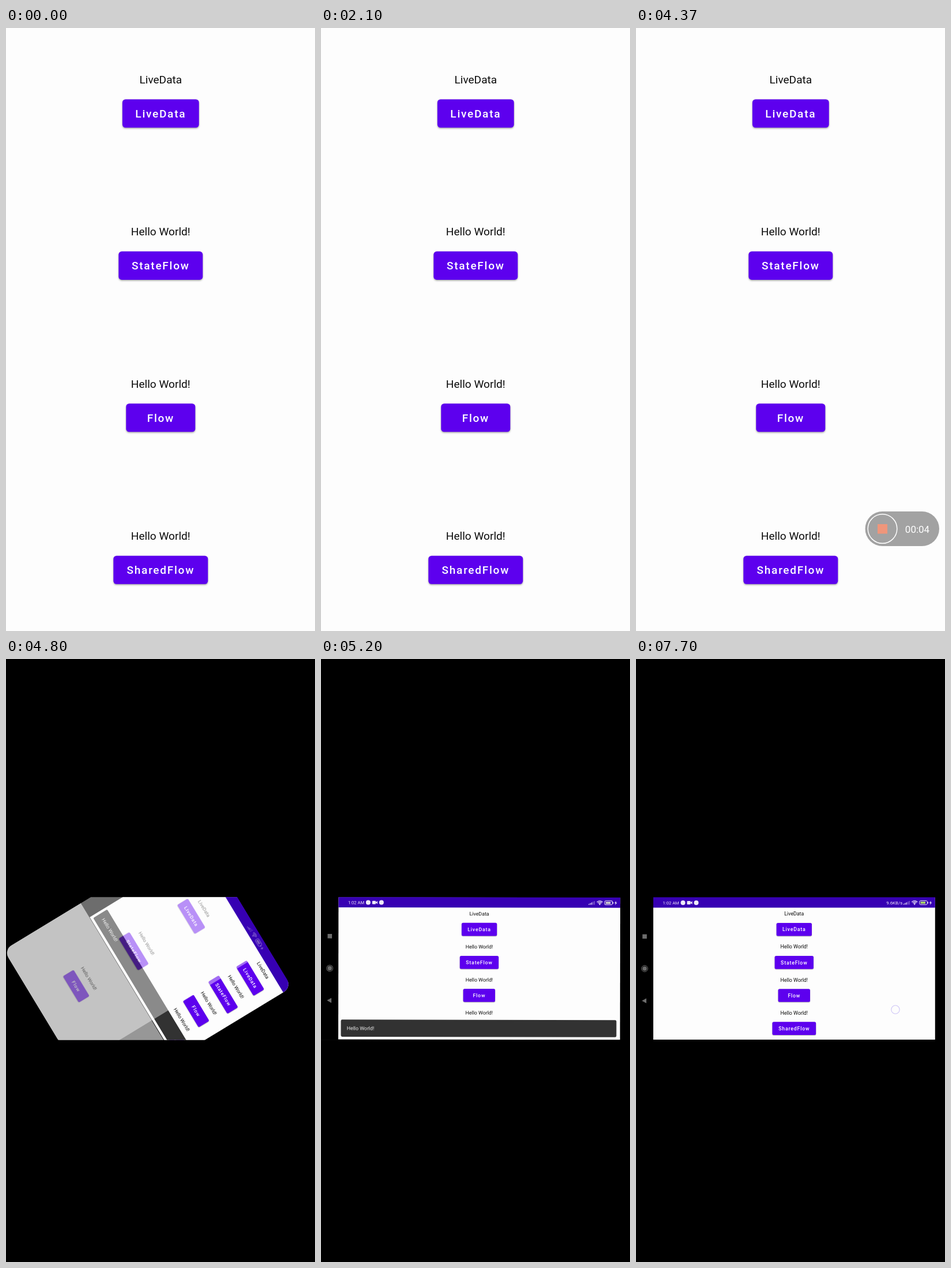
An HTML page with a canvas that plays this animation: 536x1044 px, repeating every 7730 ms.

```html
<!DOCTYPE html>
<html lang="en">
<head>
<meta charset="utf-8">
<style>
html, body { margin: 0; width: 100%; height: 100%; overflow: hidden; background: #000; }
canvas { display: block; }
</style>
</head>
<body>
<canvas id="stage" width="536" height="1044"></canvas>
<script>
const LOOP = 7730, W = 536, H = 1044;
const STRIP = W * 1080 / 2340;            // landscape screen height
const STRIP_MID = 536;
const FULL = W * 2340 / 1080;             // whole portrait screen
const CROP = 45;                          // hidden above the portrait view
const SHRINK = STRIP / W;                 // portrait to landscape scale
const PORTRAIT_DP = 1.364, LAND_DP = PORTRAIT_DP * SHRINK;
const FONT = 'Roboto, sans-serif';
const BUTTONS = [['LiveData', 97.4], ['StateFlow', 107], ['Flow', 88], ['SharedFlow', 120.2]];

const ctx = document.getElementById('stage').getContext('2d');
const portrait = document.createElement('canvas');
portrait.width = W;
portrait.height = Math.ceil(FULL);
const portraitCtx = portrait.getContext('2d');

const clamp = v => Math.max(0, Math.min(1, v));
const lerp = (a, b, p) => a + (b - a) * p;

function rect(g, x, y, w, h, color) {
  g.fillStyle = color;
  g.fillRect(x, y, w, h);
}

function pill(g, x, y, w, h, r, color) {
  g.fillStyle = color;
  g.beginPath();
  g.roundRect(x, y, w, h, r);
  g.fill();
}

function circle(g, x, y, r, color, line) {
  g.beginPath();
  g.arc(x, y, r, 0, Math.PI * 2);
  if (line) {
    g.strokeStyle = color;
    g.lineWidth = line;
    g.stroke();
  } else {
    g.fillStyle = color;
    g.fill();
  }
}

function polygon(g, points, color) {
  g.fillStyle = color;
  g.beginPath();
  points.forEach(([x, y]) => g.lineTo(x, y));
  g.fill();
}

function text(g, str, x, y, size, color, align = 'left', weight = 400, spacing = 0) {
  g.font = `${weight} ${size}px ${FONT}`;
  g.letterSpacing = spacing + 'px';
  g.textAlign = align;
  g.fillStyle = color;
  g.fillText(str, x, y);
}

// Four label and button pairs; y is the middle of the first label.
function rows(g, cx, y, pitch, dp) {
  BUTTONS.forEach(([name, width], i) => {
    const mid = y + i * pitch, top = mid + 25.1 * dp, w = width * dp;
    text(g, i ? 'Hello World!' : name, cx, mid + 5 * dp, 14 * dp, '#0c0c0c', 'center');
    g.save();
    g.shadowColor = 'rgba(0,0,0,.35)';
    g.shadowBlur = 2.2 * dp;
    g.shadowOffsetY = 1.1 * dp;
    pill(g, cx - w / 2, top, w, 36 * dp, 4 * dp, '#5d00ee');
    g.restore();
    text(g, name, cx, top + 23 * dp, 14 * dp, '#fff', 'center', 500, 1.25 * dp);
  });
}

function statusBar(g, left, right, speed) {
  rect(g, left, 0, right - left, 18.2, '#3700b3');
  const ink = '#eeeaf8';
  text(g, '1:02 AM', left + 16.6, 12.6, 7.6, ink);
  circle(g, left + 51.5, 9.7, 4, ink);
  circle(g, left + 74.5, 9.7, 4, ink);
  pill(g, left + 58.5, 6.8, 6.2, 5.8, 1, ink);
  polygon(g, [[left + 64, 9.7], [left + 67.6, 7], [left + 67.6, 12.4]], ink);

  for (let i = 0; i < 5; i++) {
    const h = 1.6 + i * 1.2;
    rect(g, right - 55 + i * 2.4, 13 - h, 1.3, h, i < 3 ? ink : '#8a6bd0');
  }
  g.lineCap = 'butt';
  for (const r of [2.2, 4.4, 6.6]) {
    g.beginPath();
    g.arc(right - 35.6, 12.9, r, -Math.PI * 0.77, -Math.PI * 0.23);
    g.strokeStyle = ink;
    g.lineWidth = 1.2;
    g.stroke();
  }
  circle(g, right - 35.6, 12.5, 1, ink);
  g.strokeStyle = ink;
  g.lineWidth = 1;
  g.beginPath();
  g.roundRect(right - 27, 6.2, 13.5, 6.8, 2);
  g.stroke();
  rect(g, right - 25.2, 7.8, 8.4, 3.6, speed ? '#a9d86a' : '#d5d4cf');
  rect(g, right - 13, 8.3, 1.2, 2.6, ink);
  polygon(g, [[right - 7, 6.2], [right - 10, 10.2], [right - 8, 10.2],
    [right - 9, 13.6], [right - 5.6, 9.2], [right - 7.6, 9.2]], ink);
  if (speed) text(g, '9.6KB/s', right - 56.5, 12.6, 7.9, ink, 'right');
}

function recorderChip(g, alpha) {
  if (!alpha) return;
  g.save();
  g.globalAlpha = alpha;
  pill(g, 397.5, 837, 128.5, 60, 30, '#a2a2a2');
  circle(g, 427.5, 867, 25.3, '#fff', 1.5);
  rect(g, 419, 859, 17, 16.5, '#ef967b');
  text(g, '00:04', 488, 873.5, 17, '#fff', 'center');
  g.restore();
}

function drawPortrait(t) {
  const g = portraitCtx;
  rect(g, 0, 0, W, FULL, '#fdfdfd');
  g.save();
  g.scale(1 / SHRINK, 1 / SHRINK);
  statusBar(g, 0, STRIP, false);
  g.restore();
  g.save();
  g.translate(0, CROP);
  rows(g, 268.3, 89.2, 263.4, PORTRAIT_DP);
  recorderChip(g, clamp((t - 4310) / 55));
  g.restore();
  rect(g, 0, FULL - 65, W, 65, '#000');
}

function navBar(g) {
  const ink = '#6c6c6c', mid = STRIP / 2;
  rect(g, 11.2, mid - 59.4, 7.6, 7.6, ink);
  circle(g, 15, mid, 5.4, ink, 1);
  circle(g, 15, mid, 3.8, ink);
  polygon(g, [[10.2, mid + 55.7], [18, mid + 51.4], [18, mid + 60]], ink);
}

function drawLandscape(g, t) {
  rect(g, 0, 0, W, STRIP, '#000');
  rect(g, 30, 0.7, 488.8, STRIP - 1.4, '#fdfdfd');
  rows(g, 274.3, 28.8, 57.15, LAND_DP);
  statusBar(g, 30, 518.8, t > 5700);
  navBar(g);

  g.save();
  g.globalAlpha = 1 - clamp((t - 7600) / 80);
  pill(g, 34.5, 212.6, 478, 29.6, 2.4, '#323232');
  text(g, 'Hello World!', 44.8, 230.6, 8.8, '#ececec');
  g.restore();

  const touch = clamp((t - 7130) / 150);
  if (touch) {
    const lift = clamp((t - 7570) / 100);
    g.save();
    g.globalAlpha = touch;
    circle(g, lerp(451, 450, lift), lerp(198, 194.7, lift), 7.2, '#cdc4f6', 1.1);
    g.restore();
  }
}

// Slightly underdamped spring from 0 to 1, stopped at its rest point.
function turn(t) {
  const s = Math.max(0, t - 4650) / 1000;
  if (s > 0.6) return 1;
  const a = s * 4.5;
  return clamp(1 - Math.exp(-6 * s) * (Math.cos(a) + Math.sin(a) * 4 / 3));
}

function drawRotation(t) {
  const p = turn(t), dip = Math.sin(Math.PI * p);
  const cardScale = 1 - 0.108 * dip, zoom = 1 - 0.045 * dip;
  const w = lerp(STRIP, W, p) * cardScale, h = lerp(W, STRIP, p) * cardScale;
  const oldAlpha = 1 - clamp((t - 4630) / 300);

  ctx.save();
  ctx.beginPath();
  ctx.rect(0, STRIP_MID - STRIP / 2, W, STRIP);
  ctx.clip();
  ctx.translate(W / 2 - 25 * dip, STRIP_MID);
  ctx.rotate((1 - p) * Math.PI / 2);
  ctx.translate(-w / 2, -h / 2);
  if (p < 1) {
    ctx.beginPath();
    ctx.roundRect(0, 0, w, h, 18 * dip);
    ctx.clip();
  }
  const below = STRIP * zoom;
  if (h > below) rect(ctx, 0, below, w, h - below, '#979797');
  ctx.scale(zoom, zoom);
  drawLandscape(ctx, t);
  if (oldAlpha) {
    ctx.globalAlpha = oldAlpha;
    ctx.imageSmoothingQuality = 'high';
    ctx.drawImage(portrait, 0, 0, STRIP, portrait.height * SHRINK);
  }
  ctx.restore();
}

function frame(now) {
  const t = now % LOOP;
  rect(ctx, 0, 0, W, H, '#000');
  if (t < 5000) drawPortrait(t);
  if (t < 4470) ctx.drawImage(portrait, 0, -CROP);
  else drawRotation(t);
  requestAnimationFrame(frame);
}
requestAnimationFrame(frame);
</script>
</body>
</html>
```
